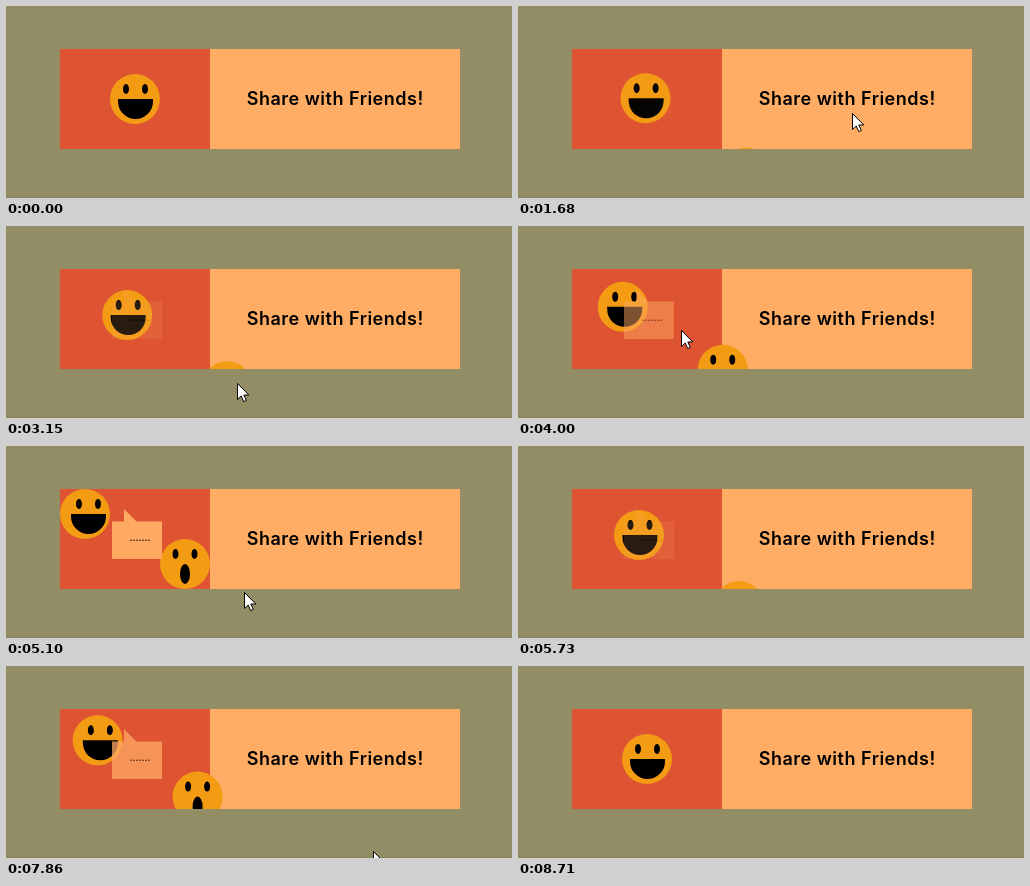
An HTML page for the animation above (8970 ms loop, 506 by 192 pixels).

```html
<!DOCTYPE html>
<html lang="en">
<head>
<meta charset="utf-8">
<title>Share with Friends</title>
<style>
  html, body { margin: 0; width: 100%; height: 100%; overflow: hidden; background: #928d64; }
  svg { display: block; width: 506px; height: 192px; }
  text { font-family: Inter, "Open Sans", sans-serif; fill: #000; }
  .label { font-size: 18px; font-weight: 600; letter-spacing: .5px; text-anchor: middle; }
  .dots { font-size: 9px; font-weight: 700; }
  .skin { fill: #f49b14; }
</style>
</head>
<body>
<svg viewBox="0 0 506 192">
  <defs>
    <clipPath id="card"><rect x="54" y="43" width="400" height="100"/></clipPath>
    <g id="eyes">
      <ellipse cx="-9.5" cy="-10" rx="3" ry="5"/>
      <ellipse cx="9.5" cy="-10" rx="3" ry="5"/>
    </g>
  </defs>
  <rect width="506" height="192" fill="#928d64"/>
  <rect y="191" width="506" height="1" fill="#89845e"/>
  <g clip-path="url(#card)">
    <rect x="54" y="43" width="150" height="100" fill="#de5432"/>
    <rect x="204" y="43" width="250" height="100" fill="#ffad64"/>
    <text class="label" x="329.2" y="99.4">Share with Friends!</text>
    <g id="happy">
      <circle class="skin" r="25"/>
      <g id="grin">
        <use href="#eyes"/>
        <path d="M-17.5 0h35v2.5a17.5 17.5 0 0 1-35 0z"/>
      </g>
    </g>
    <g id="amazed">
      <circle class="skin" r="25"/>
      <use href="#eyes"/>
      <ellipse cy="10" rx="5" ry="10"/>
    </g>
    <g id="bubble">
      <path d="M106 75.5h12V63l12.5 12.5H156V113h-50z" fill="#ffa963"/>
      <text class="dots" x="123.5" y="95">.......</text>
    </g>
  </g>
  <path id="cursor" d="M.5 .5v16l3.7-3.5 2.5 5.6 2.6-1.1-2.5-5.5h5z" fill="#fff" stroke="#000"/>
</svg>
<script>
const LOOP = 8970;
const FADE = 1000;

// When the pointer enters and leaves the card
const HOVERS = [
  { enter: 1635, leave: 2605 },
  { enter: 3715, leave: 5190 },
  { enter: 6553, leave: 7680 }
];

// Pointer visits; each stop is time, x, y
const VISITS = [
  [
    [1530, 405, 167], [1670, 341, 108], [1950, 168, 80], [2450, 163, 78],
    [2660, 237, 146], [3360, 229, 161], [3640, 225, 150], [3920, 163, 104],
    [4890, 163, 101], [5100, 238, 146], [5380, 340, 205]
  ],
  [[6520, 263, 143], [6810, 161, 97], [7440, 163, 97], [7860, 367, 185], [7930, 390, 205]]
];

const el = id => document.getElementById(id);
const [happy, grin, amazed, bubble, cursor] =
  ["happy", "grin", "amazed", "bubble", "cursor"].map(el);
const mix = (a, b, k) => a + (b - a) * k;
const move = (node, x, y) => node.setAttribute("transform", `translate(${x} ${y})`);
const bezier = (a, b, u) => 3 * a * u * (1 - u) ** 2 + 3 * b * u * u * (1 - u) + u ** 3;

// CSS "ease": cubic-bezier(.25, .1, .25, 1)
function ease(x) {
  if (x <= 0) return 0;
  if (x >= 1) return 1;
  let lo = 0, hi = 1;
  for (let i = 0; i < 24; i++) {
    const mid = (lo + hi) / 2;
    if (bezier(.25, .25, mid) < x) lo = mid; else hi = mid;
  }
  return bezier(.1, 1, lo);
}

function hover(t) {
  const fade = start => ease((t - start) / FADE);
  return HOVERS.reduce((sum, h) => sum + fade(h.enter) - fade(h.leave), 0);
}

function pointer(t) {
  const stops = VISITS.find(v => t >= v[0][0] && t < v.at(-1)[0]);
  if (!stops) return null;
  const i = stops.findIndex(s => s[0] > t);
  const [t0, x0, y0] = stops[i - 1], [t1, x1, y1] = stops[i];
  const k = (t - t0) / (t1 - t0);
  return [mix(x0, x1, k), mix(y0, y1, k)].map(Math.round);
}

function draw(t) {
  const p = hover(t);
  move(happy, mix(129, 79, p), mix(93, 68, p));
  move(grin, mix(.5, 3.5, p), 0);
  move(amazed, mix(229, 179, p), mix(168, 118, p));
  bubble.setAttribute("opacity", p);

  const tip = pointer(t);
  cursor.style.display = tip ? "" : "none";
  if (tip) move(cursor, ...tip);
}

const begin = performance.now();
function tick() {
  draw((performance.now() - begin) % LOOP);
  requestAnimationFrame(tick);
}
tick();
</script>
</body>
</html>
```
